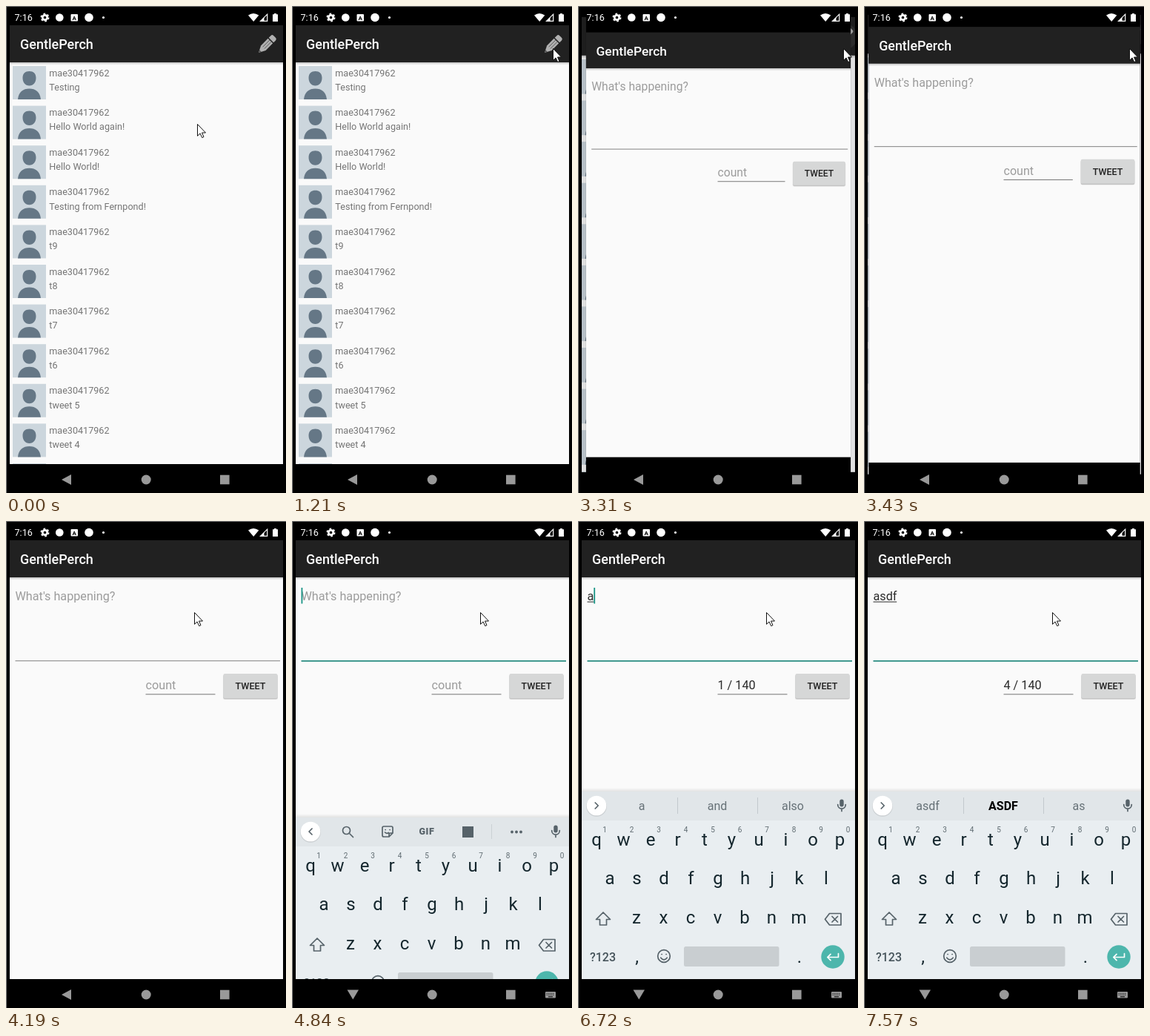
Animation of 378 by 657 pixels, one loop 8 s. Source, as an HTML page:

```html
<!DOCTYPE html>
<html lang="en">
<head>
<meta charset="utf-8">
<title>Compose screen</title>
<style>
html, body { margin: 0; width: 100%; height: 100%; overflow: hidden; background: #000; }
svg { display: block; width: 378px; height: 657px; font-family: Roboto, "Liberation Sans", sans-serif; }
.mid { text-anchor: middle; }
.title { font-size: 18px; font-weight: 500; fill: #fff; }
.row { font-size: 12.6px; fill: #757575; }
.field { font-size: 16.2px; }
.key { font-size: 24px; fill: #14262d; }
.num { font-size: 10px; fill: #5f6b71; }
.hint { font-size: 16px; fill: #667177; }
.line { fill: none; stroke: #566269; stroke-width: 1.7; stroke-linejoin: round; stroke-linecap: round; }
</style>
</head>
<body>
<svg viewBox="0 0 378 657">
  <defs>
    <clipPath id="screen"><rect x="5" y="0" width="369" height="657"/></clipPath>
    <clipPath id="body"><rect x="5" y="76" width="369" height="542"/></clipPath>
    <linearGradient id="shade" x2="0" y2="1">
      <stop stop-color="#000" stop-opacity=".22"/><stop offset="1" stop-color="#000" stop-opacity="0"/>
    </linearGradient>
    <linearGradient id="lift" x2="0" y2="1">
      <stop stop-color="#000" stop-opacity="0"/><stop offset="1" stop-color="#000" stop-opacity=".1"/>
    </linearGradient>
    <g id="avatar">
      <rect width="45" height="45" fill="#ccd6dd"/>
      <path d="M22.5 7C28 7 31.5 10 31.5 16C31.5 22 28 26.5 22.5 26.5S13.5 22 13.5 16C13.5 10 17 7 22.5 7ZM7 45C8 35 14 30.5 22.5 30.5S37 35 38 45Z" fill="#657786"/>
    </g>
    <g id="frame">
      <rect x="5" width="369" height="657"/>
      <rect x="5" y="26" width="369" height="50" fill="#212121"/>
      <rect x="5" y="76" width="369" height="542" fill="#fafafa"/>
      <rect x="5" y="76" width="369" height="3.5" fill="url(#shade)"/>
      <text class="title" x="19" y="58">GentlePerch</text>
    </g>
    <g id="mic">
      <rect x="-2.7" y="-8.5" width="5.4" height="10" rx="2.7" fill="#566269"/>
      <path class="line" d="M-5.3 -1.5C-5.3 6 5.3 6 5.3 -1.5M0 4.5V7.5"/>
    </g>
  </defs>

  <g clip-path="url(#screen)">
    <g id="list">
      <use href="#frame"/>
      <g id="rows" clip-path="url(#body)"></g>
      <circle id="ripple" cx="352.5" cy="51.3" fill="#fff"/>
      <g transform="translate(341 63) rotate(-45)" fill="#b0b0b0">
        <path d="M0 0L9 -4.6H22.5V4.6H9Z"/>
        <path d="M24 -4.6H28Q30.5 -4.6 30.5 -2V2Q30.5 4.6 28 4.6H24Z"/>
        <path d="M9.5 -1.5H22.5M9.5 1.7H22.5" stroke="#555" stroke-width=".9"/>
        <path d="M0 0L3.5 -1.8V1.8Z" fill="#555"/>
      </g>
      <rect id="dim" x="5" width="369" height="657"/>
    </g>

    <g id="compose">
      <use href="#frame"/>
      <text id="ask" class="field" x="12.5" y="107" fill="#9c9c9c">What's happening?</text>
      <text id="typed" class="field" x="12.5" y="107" fill="#2a2a2a"></text>
      <rect id="spell" x="12.5" y="108.6" height="1" fill="#2a2a2a"/>
      <rect id="caret" y="90" width="1.8" height="21.5" fill="#1a9485"/>
      <rect id="rule" x="12.5" width="357.5"/>
      <text id="count" class="field" x="188.5" y="227"></text>
      <rect x="188.5" y="233.3" width="94" height="1" fill="#757575"/>
      <rect x="293" y="207" width="74" height="34" rx="2.5" opacity=".09"/>
      <rect x="293.5" y="207" width="73" height="33.3" rx="2" opacity=".14"/>
      <rect x="293.5" y="206" width="73" height="33" rx="2" fill="#d6d7d7"/>
      <text class="mid" x="330" y="227" font-size="12.6" font-weight="500" fill="#212121">TWEET</text>
    </g>
  </g>

  <g clip-path="url(#body)">
    <g id="keyboard">
      <rect x="5" y="360" width="369" height="5" fill="url(#lift)"/>
      <rect x="5" y="365" width="369" height="253" fill="#e9eef1"/>
      <rect x="5" y="365" width="369" height="39" fill="#e1e6e9"/>
      <circle cx="25" cy="385" r="13.8" opacity=".1"/>
      <circle cx="25" cy="384" r="13.3" fill="#fff"/>
      <path id="chevron" class="line"/>
      <use href="#mic" x="356" y="384"/>
      <g id="tools">
        <path class="line" d="M78 387L82.5 391.5"/>
        <circle class="line" cx="73.5" cy="382.5" r="5"/>
        <path class="line" d="M124 377H134Q136 377 136 379V386L131 391H124Q122 391 122 389V379Q122 377 124 377ZM131 391V388Q131 386 133 386H136M126 381.5H126.2M132 381.5H132.2M125.5 385Q128 387.5 130.5 385.5" stroke-width="1.5"/>
        <text class="mid" x="182" y="388.4" font-size="12.5" font-weight="900" letter-spacing=".7" fill="#566269">GIF</text>
        <rect x="230" y="377" width="15" height="15" fill="#566269"/>
        <rect x="269" y="374" width="1" height="20" fill="#cbd1d4"/>
        <g fill="#566269"><circle cx="297" cy="384.5" r="1.9"/><circle cx="303" cy="384.5" r="1.9"/><circle cx="309" cy="384.5" r="1.9"/></g>
      </g>
      <g id="words" class="hint mid">
        <text x="86" y="390"></text><text x="188" y="390"></text><text x="290" y="390"></text>
        <path d="M134.5 373V395M242.5 373V395" stroke="#c3c9cd"/>
      </g>
      <g id="keys" class="mid"></g>
      <path class="line" d="M34 528L43.5 537.5H38.5V545H29.5V537.5H24.5Z"/>
      <path class="line" d="M339.5 529.5H355V545H339.5L333.5 537.2ZM343 533.5L350.5 541M350.5 533.5L343 541"/>
      <text class="mid" x="33.5" y="593.5" font-size="16" font-weight="500" fill="#45535a">?123</text>
      <text class="key mid" x="79.5" y="596" font-size="22">,</text>
      <text class="key mid" x="299" y="596" font-size="22">.</text>
      <circle class="line" cx="116" cy="587" r="8.3"/>
      <path class="line" d="M113 584.5H113.2M119 584.5H119.2M111.8 589.2Q116 594.5 120.2 589.2"/>
      <rect x="143" y="574" width="128.5" height="27" rx="2.5" fill="#c9ced1"/>
      <circle cx="344" cy="588" r="15.7" fill="#4db6ac"/>
      <path class="line" d="M351.5 583.5V588.5H337M341 584.3L336.8 588.5L341 592.7" style="stroke:#fff"/>
    </g>
  </g>

  <g fill="#fff">
    <text x="11.5" y="20" font-size="12.6">7:16</text>
    <circle cx="52.5" cy="15.5" r="3.2" fill="none" stroke="#fff" stroke-width="2.7"/>
    <circle cx="52.5" cy="15.5" r="5" fill="none" stroke="#fff" stroke-width="2" stroke-dasharray="2.6 2.636"/>
    <circle cx="72.3" cy="15.5" r="5.3"/>
    <rect x="87.5" y="11" width="9.5" height="9.5" rx="1"/>
    <text class="mid" x="92.3" y="18.8" font-size="8" font-weight="700" style="fill:#000">A</text>
    <circle cx="112" cy="15.5" r="5.8"/>
    <circle cx="131.5" cy="15.5" r="1.6"/>
    <path d="M327 12.5Q334 7.3 341.3 12.5L334.2 21Z"/>
    <path d="M343.5 20.3H352.7V11.1Z" fill="none" stroke="#fff" stroke-width="1.2"/>
    <path d="M343 20.8L348.5 15.3V20.8Z"/>
    <path d="M360 11.2H362V10H365V11.2H367V21H360Z"/>
  </g>
  <g fill="#999">
    <path id="back"/>
    <circle cx="189.2" cy="639" r="6.5"/>
    <rect x="289" y="632.7" width="12.6" height="12.6"/>
    <g id="switcher">
      <rect x="342" y="635" width="14" height="8.5" rx="1"/>
      <path d="M343.5 637.3H354.5M343.5 639.3H354.5" stroke="#000" stroke-dasharray="1 1.2"/>
      <path d="M346 641.8H352" stroke="#000"/>
    </g>
  </g>
  <path d="M0 .5H378M.5 0V657" stroke="#777"/>
  <path id="pointer" d="M.5 .5V16.3L4.1 12.9L6.7 18.6L9 17.6L6.5 12H11.5Z" fill="#fff" stroke="#111" stroke-width="1"/>
</svg>
<script>
const LOOP = 8000;
const $ = id => document.getElementById(id);
const set = (id, attrs) => { for (const k in attrs) $(id).setAttribute(k, attrs[k]); };
const show = (id, on) => { $(id).style.display = on ? "" : "none"; };

// Latest entry whose start time has passed.
const at = (steps, t) => steps.reduce((a, b) => b[0] <= t ? b : a);
const zoom = s => `translate(189.5 326) scale(${s}) translate(-189.5 -326)`;

const posts = ["Testing", "Hello World again!", "Hello World!", "Testing from Fernpond!",
  "t9", "t8", "t7", "t6", "tweet 5", "tweet 4", "tweet 3"];
$("rows").innerHTML = posts.map((post, i) => `<g transform="translate(0 ${i * 53.6})">
  <use href="#avatar" x="9" y="81"/>
  <text class="row" x="58.3" y="94.5">mae30417962</text>
  <text class="row" x="58.3" y="113.8">${post}</text></g>`).join("");

const keyRows = [["qwertyuiop", 25, 437.5], ["asdfghjkl", 43, 490], ["zxcvbnm", 79, 543]];
$("keys").innerHTML = keyRows.map(([chars, x0, y], r) => [...chars].map((c, i) => {
  const x = x0 + i * 36.5;
  const digit = r ? "" : `<text class="num" x="${x + 11}" y="420">${(i + 1) % 10}</text>`;
  return `<text class="key" x="${x}" y="${y}">${c}</text>` + digit;
}).join("")).join("");

// time, x, y
const pointer = [[0, 258, 159], [120, 275, 142], [270, 294, 104], [390, 309, 72], [540, 310, 64],
  [690, 323, 60], [940, 329, 57], [1090, 341, 57], [1210, 352, 57], [1330, 358, 57],
  [3950, 330, 74], [4070, 277, 111], [4190, 254, 123]];
// time, radius, opacity
const ripple = [[0, 0, 0], [2860, 10, .07], [3010, 18, .12], [3160, 17.7, .07]];
// time, list scale, compose scale, dim
const windows = [[0, 1, 0, 0], [3310, 1.037, .968, .1], [3430, 1.047, .993, .1], [3550, 1, 1, 0]];
// time, drop below the resting place
const keyboard = [[0, 260], [4720, 150], [4840, 35], [4960, 0]];
// time, caret visible
const blink = [[0, 0], [4720, 1], [5110, 0], [5670, 1], [6200, 0], [6600, 1], [7570, 0]];
// time, text, caret x, suggestions
const typing = [[0, "", 12.5], [6600, "a", 21.3], [6720, "a", 21.3, ["a", "and", "also"]],
  [6840, "as", 29.3, ["as", "ask", "asked"]], [6990, "asd", 38, ["asd", "ASD", "as"]],
  [7140, "asdf", 44.2, ["asdf", "ASDF", "as"]]];

function render(t) {
  const [, px, py] = at(pointer, t);
  set("pointer", { transform: `translate(${px} ${py})` });

  const [, r, glow] = at(ripple, t);
  set("ripple", { r, opacity: glow });

  const [, back, front, dim] = at(windows, t);
  set("list", { transform: zoom(back) });
  set("dim", { opacity: dim });
  set("compose", { transform: zoom(front) });
  show("list", front < 1);
  show("compose", front > 0);

  const open = t >= 4720;
  show("keyboard", open);
  show("switcher", open);
  set("keyboard", { transform: `translate(0 ${at(keyboard, t)[1]})` });
  set("back", { d: open ? "M74.5 632.5H90L82.3 645.5Z" : "M75 639L88 632V646Z" });

  const focus = t >= 4470;
  set("rule", { y: focus ? 188 : 188.2, height: focus ? 1.7 : 1, fill: focus ? "#23897e" : "#808080" });

  const [, text, x, words] = at(typing, t);
  $("typed").textContent = text;
  show("ask", !text);
  set("spell", { width: x - 12.5 });
  set("caret", { x });
  show("caret", at(blink, t)[1]);
  $("count").textContent = text ? `${text.length} / 140` : "count";
  set("count", { fill: text ? "#2a2a2a" : "#9c9c9c" });

  show("tools", !words);
  show("words", words);
  set("chevron", { d: words ? "M23.2 380L27.2 384L23.2 388" : "M27 380L23 384L27 388" });
  if (words) {
    [...$("words").querySelectorAll("text")].forEach((el, i) => {
      const strong = i === 1 && words[1] === words[1].toUpperCase();
      el.textContent = words[i];
      el.style.fontWeight = strong ? 700 : 400;
      el.style.fill = strong ? "#000" : "";
    });
  }
}

const start = performance.now();
function tick() {
  render((performance.now() - start) % LOOP);
  requestAnimationFrame(tick);
}
tick();
</script>
</body>
</html>
```
